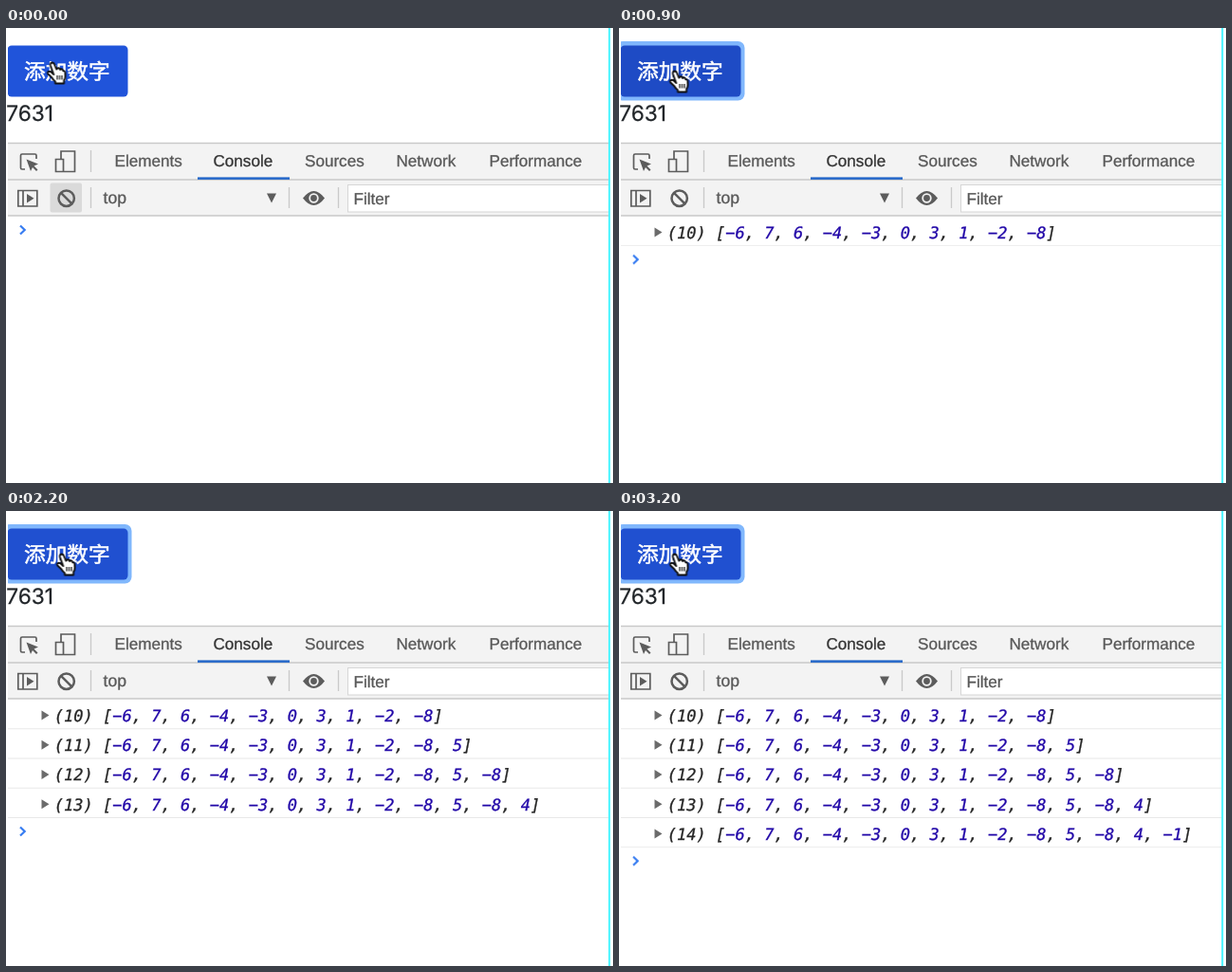
An HTML page for the animation above (3.4 s loop, 640x480 px).

```html
<!DOCTYPE html>
<html lang="zh">
<head>
<meta charset="utf-8">
<title>Console</title>
<style>
  html, body { margin: 0; width: 100%; height: 100%; overflow: hidden; background: #fff; }
  svg { display: block; width: 640px; height: 480px; text-rendering: geometricPrecision; }
  .ui { font: 17.1px "Liberation Sans", Arial, sans-serif; fill: #585858; stroke: #585858; stroke-width: .3; }
  .ui .active { fill: #333; stroke: #333; }
  .log { font: italic 17.02px "DejaVu Sans Mono", monospace; fill: #252525; stroke: #252525; stroke-width: .3; }
  .num { fill: #2208a8; stroke: #2208a8; }
  .label { font: 500 22.7px "Noto Sans CJK SC", "Noto Sans CJK", sans-serif; fill: #fff; stroke: #fff; stroke-width: .55; }
  .total { font: 22.7px Inter, sans-serif; fill: #212529; stroke: #212529; stroke-width: .25; }
  .icon { fill: none; stroke: #5c5c5c; stroke-width: 1.7; }
  .solid { fill: #5c5c5c; }
  .rule { stroke: #c9c9c9; stroke-width: 1.3; }

  #button, #ring, #toggle, #sheet, #hand { animation: 3.4s step-end infinite; }
  #button { animation-name: press; }
  #ring { animation-name: focus; }
  #toggle { animation-name: blur; }
  #sheet { animation-name: log; }
  #hand { animation-name: point; }

  /* 100 ms = 2.94 % */
  @keyframes press {
    0% { fill: #2054da; }
    2.94% { fill: #2052d4; }
    8.82% { fill: #2050cf; }
    11.76%, 23.52%, 47.05%, 61.76%, 76.47% { fill: #1e4bc5; }
    17.64%, 32.35%, 50%, 64.7%, 82.35% { fill: #2050d0; }
  }
  @keyframes focus {
    0% { opacity: 0; }
    11.76%, 100% { opacity: 1; }
  }
  @keyframes blur {
    0% { opacity: 1; }
    11.76%, 100% { opacity: 0; }
  }
  @keyframes log {
    0% { transform: translateY(0); }
    14.7% { transform: translateY(31.25px); }
    29.41% { transform: translateY(62.5px); }
    47.05% { transform: translateY(93.75px); }
    61.76% { transform: translateY(125px); }
    79.41%, 100% { transform: translateY(156.25px); }
  }
  @keyframes point {
    0% { transform: translate(43.5px, 35px); }
    2.94% { transform: translate(48.5px, 39.5px); }
    5.88% { transform: translate(52.5px, 43px); }
    8.82%, 100% { transform: translate(53.5px, 44px); }
  }
</style>
</head>
<body>
<svg viewBox="0 0 640 480">
  <defs><clipPath id="page"><rect x="2" width="633.5" height="480"/></clipPath></defs>

  <g clip-path="url(#page)">
    <rect id="ring" x="-3" y="14" width="135.5" height="62.5" rx="7" fill="#80b7fc"/>
    <rect id="button" x="1.5" y="18.5" width="127" height="54" rx="4.5"/>
  </g>
  <text class="label" x="19" y="53.7">添加数字</text>
  <text class="total" x="0.3" y="98">7631</text>

  <g clip-path="url(#page)">
    <g id="rows"></g>
    <g id="sheet">
      <rect y="199" width="640" height="300" fill="#fff"/>
      <path d="M15 208.5l4.7 4.5-4.7 4.5" fill="none" stroke="#367cf1" stroke-width="2.2"/>
    </g>

    <rect y="121" width="640" height="77" fill="#f3f3f3"/>
    <path class="rule" d="M0 121.5H640M0 160H640M0 198H640"/>
    <path class="rule" d="M89.5 129V152M89.5 168V190M298.5 168V190M350.5 168V190"/>
    <rect x="202" y="157.4" width="97" height="2.5" fill="#2467c9"/>
    <rect x="360.5" y="165.5" width="300" height="28.5" fill="#fff" stroke="#d6d6d6"/>
    <rect id="toggle" x="46.5" y="163.5" width="33.5" height="31" rx="2" fill="#dadada"/>

    <g class="icon">
      <path d="M20 149H17Q15.5 149 15.5 147.5V134.5Q15.5 133 17 133H30.5Q32 133 32 134.5V138"/>
      <path d="M58 138V130H72.5V151.5H60.5M52.5 138.5H60.5V151.5H52.5Z"/>
      <path d="M12.8 171.5H32.8V188H12.8ZM18 171.5V188"/>
      <circle cx="63.7" cy="179.7" r="8.2" stroke-width="2.5"/>
      <path d="M58.2 174.2L69.2 185.2" stroke-width="2.5"/>
    </g>
    <g class="solid">
      <path d="M21.5 138.5L34 143.5 29.5 145.5 33.5 149.5 32 151 28 147 26 151Z"/>
      <path d="M22 175L29.5 179.8 22 184.5Z"/>
      <path d="M275 174.5H285L280 184.5Z"/>
      <path d="M313 179.5Q324.5 164.5 336 179.5Q324.5 194.5 313 179.5Z"/>
    </g>
    <circle cx="324.5" cy="179.5" r="4.3" fill="#5c5c5c" stroke="#f3f3f3" stroke-width="1.8"/>
  </g>

  <g class="ui">
    <text x="114.5" y="146">Elements</text>
    <text class="active" x="218.5" y="146">Console</text>
    <text x="315" y="146">Sources</text>
    <text x="411.5" y="146">Network</text>
    <text x="509.5" y="146">Performance</text>
    <text x="102.5" y="184.6" font-size="17.6">top</text>
    <text x="366.5" y="185.8">Filter</text>
  </g>

  <rect x="635.2" width="2" height="480" fill="#45f5ff"/>

  <g id="hand" stroke="#111" stroke-width="1.9" stroke-linejoin="round">
    <path fill="#fff" d="M6.8 14L3.5 5Q2.8 2 5 1.5Q6.8 1.2 7.7 3.6L9.8 8.6Q10.5 7 12 7.3Q13.3 7.6 13.6 9Q14.6 7.8 15.7 8.5Q16.6 9.1 16.8 10.3Q18.700 10 18.900 12.200L19.100 16Q19 18.500 17.600 20.500V23.500H8.500V21.500Q6.300 20 4.800 17.300L1.100 13.800Q-.3 12 1.300 11Q3 10.300 5 12.300Z"/>
    <path fill="none" stroke-width="1.2" d="M10.500 15V19.500M13 15V19.500M15.500 15V19.500"/>
  </g>
</svg>
<script>
  const numbers = [-6, 7, 6, -4, -3, 0, 3, 1, -2, -8, 5, -8, 4, -1];
  const firstCount = 10, pitch = 31.25;

  const numberSpan = n => `<tspan class="num">${String(n).replace('-', '−')}</tspan>`;

  function logRow(i) {
    const count = firstCount + i;
    const list = numbers.slice(0, count).map(numberSpan).join(', ');
    return `<g transform="translate(0 ${i * pitch})">
      <path d="M37.5 210.5L45.5 215.5 37.5 220.5Z" fill="#6b6b6b"/>
      <text class="log" x="50.8" y="221.8">(${count}) [${list}]</text>
      <path d="M0 229.7H640" stroke="#e8e8e8" stroke-width="1.1"/>
    </g>`;
  }

  document.getElementById('rows').innerHTML =
    Array.from({ length: numbers.length - firstCount + 1 }, (_, i) => logRow(i)).join('');
</script>
</body>
</html>
```
